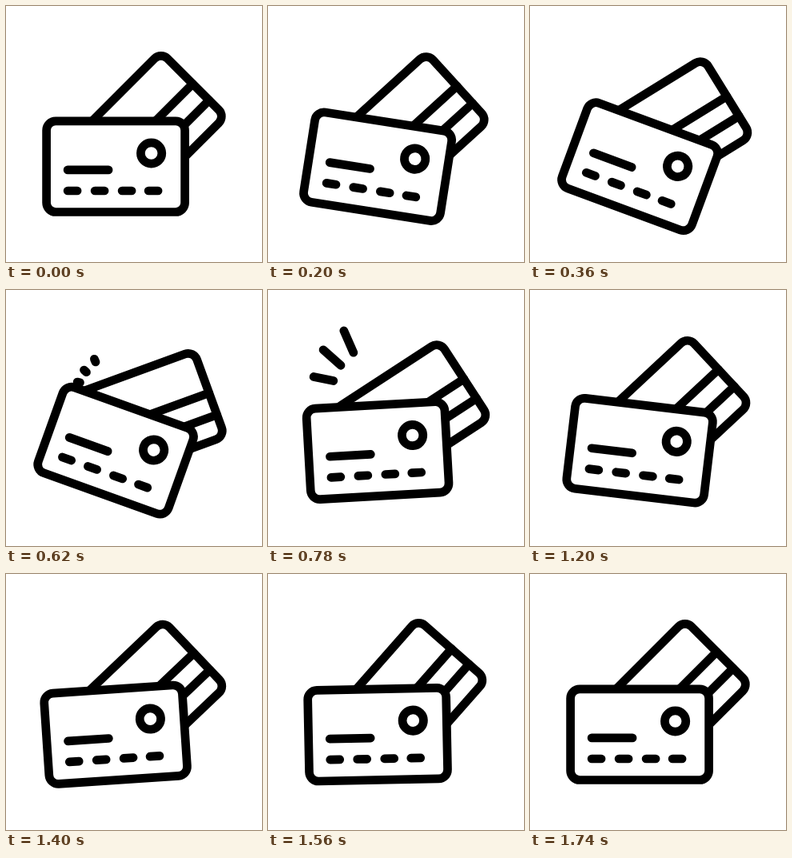
An HTML page that plays this animation: 320x320 px, repeating every 2.4 s.

```html
<!DOCTYPE html>
<html lang="en">
<head>
<meta charset="utf-8">
<title>Bank cards</title>
<style>
html, body { margin: 0; width: 100%; height: 100%; overflow: hidden; background: #fff; }
svg { display: block; width: 100vw; height: 100vh; }
</style>
</head>
<body>
<svg viewBox="0 0 320 320" fill="none" stroke="#000" stroke-width="10.7" stroke-linecap="round">
  <g id="sparks"><path/><path/><path/></g>
  <g id="back">
    <rect x="-72" y="-56.8" width="158.6" height="113.6" rx="11.5" fill="#fff"/>
    <path d="M-72 -.8H86.6M-72 28.2H86.6"/>
  </g>
  <g id="front">
    <rect x="-86.5" y="-56.8" width="173" height="113.6" rx="11.5" fill="#fff"/>
    <circle cx="44.5" cy="-16.7" r="13.2"/>
    <path d="M-60 4.2H-9M-60 30.3h12M-26 30.3h12M8 30.3h12M41 30.3h12"/>
  </g>
</svg>
<script>
const LOOP = 2400, BACK_DELAY = 100;
// Damped swing: [time in ms, angle in degrees]
const swing = [[0, 0], [500, 25], [533, 25], [920, -15], [1182, 7], [1418, -4], [1640, 0]];
// Start and end of each spark's path
const rays = [[112, 90, 79.5, 16], [100.5, 102.7, 41, 50], [92.5, 115.7, 25.5, 102]];
const [front, back, sparks] = ['front', 'back', 'sparks'].map(id => document.getElementById(id));

const clamp = u => Math.min(1, Math.max(0, u));
const ease = u => u * u * (3 - 2 * u);

function angle(t) {
  if (t <= 0) return 0;
  const i = swing.findIndex(([time]) => time > t);
  if (i < 0) return 0;
  const [t0, a0] = swing[i - 1], [t1, a1] = swing[i];
  return a0 + (a1 - a0) * ease((t - t0) / (t1 - t0));
}

function drawSparks(t) {
  const head = clamp((t - 604) / 335), tail = clamp((t - 723) / 365);
  rays.forEach(([x0, y0, x1, y1], i) => {
    const at = u => `${x0 + (x1 - x0) * u} ${y0 + (y1 - y0) * u}`;
    sparks.children[i].setAttribute('d', head > tail ? `M${at(tail)}L${at(head)}` : '');
  });
}

function draw(t) {
  front.setAttribute('transform', `translate(137.1 200.7) rotate(${angle(t)})`);
  back.setAttribute('transform', `translate(172.7 159.1) rotate(${angle(t - BACK_DELAY) - 45})`);
  drawSparks(t);
}

const start = performance.now();
function tick() {
  draw((performance.now() - start) % LOOP);
  requestAnimationFrame(tick);
}
tick();
</script>
</body>
</html>
```
